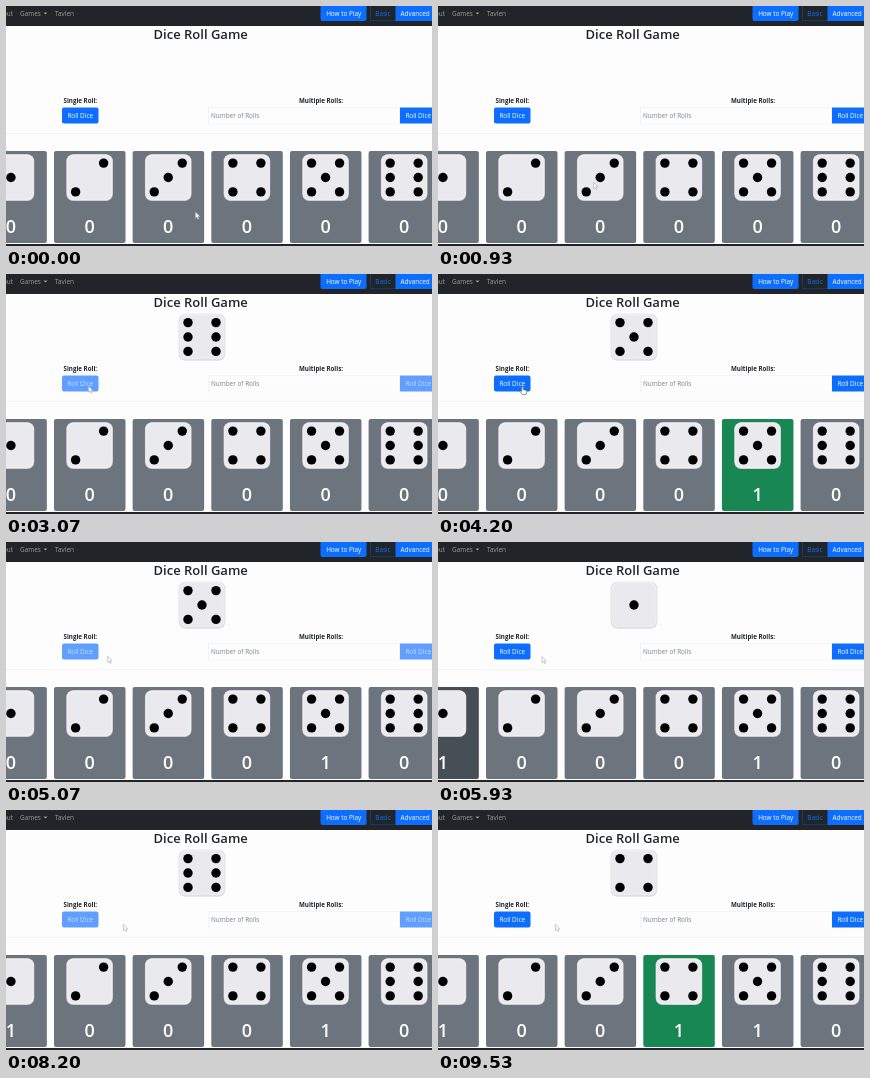
Recreate the animation shown at these times as an HTML page with a canvas. Size 426x240 px, loop 9590 ms.

```html
<!DOCTYPE html>
<html lang="en">
<head>
<meta charset="utf-8">
<title>Dice Roll Game</title>
<style>
  html, body { margin: 0; width: 100%; height: 100%; overflow: hidden; background: #fdfdfe; }
  canvas { display: block; width: 426px; height: 240px; }
</style>
</head>
<body>
<canvas id="stage"></canvas>
<script>
const LOOP = 9590, STEP = 100;
const BLUE = '#0d6efd', HOVER = '#0b5ed7', GREY = '#6c757d', GREEN = '#198754', DARK = '#212529';
const canvas = document.getElementById('stage');
const ctx = canvas.getContext('2d');
const scale = window.devicePixelRatio || 1;
canvas.width = 426 * scale;
canvas.height = 240 * scale;

// Each roll shows its faces one after another; the last one is the result.
const rolls = [
  { start: 2050, faces: '362415364261325' },
  { start: 4400, faces: '253641526345261' },
  { start: 7400, faces: '425316246153624' }
].map(r => ({ ...r, end: r.start + r.faces.length * STEP, result: +r.faces.at(-1) }));

// Pointer tip: time, x, y
const path = [[0, 189.5, 206], [500, 189.5, 206], [1650, 82.5, 112], [3300, 82.5, 112],
  [4000, 84.5, 112.5], [4600, 84.5, 112.5], [5200, 104, 114.5], [6200, 104, 114.5],
  [6850, 79, 109], [7550, 79, 109], [8050, 117.5, 114.5], [LOOP, 117.5, 114.5]];
const handTimes = [[1500, 2150], [3550, 4480], [6700, 7480]];
const hoverTimes = [[1500, 2050], [7200, 7400]];
const during = (t, spans) => spans.some(([a, b]) => t >= a && t < b);

function pointerAt(t) {
  const i = Math.max(1, path.findIndex(p => p[0] > t));
  const [t0, x0, y0] = path[i - 1], [t1, x1, y1] = path[i];
  const u = (t - t0) / (t1 - t0), e = u * u * (3 - 2 * u);
  return [x0 + (x1 - x0) * e, y0 + (y1 - y0) * e];
}

function box(x, y, w, h, r, fill) {
  ctx.beginPath();
  ctx.roundRect(x, y, w, h, r);
  ctx.fillStyle = fill;
  ctx.fill();
}

function outline(x, y, w, h, color) {
  ctx.strokeStyle = color;
  ctx.lineWidth = 0.5;
  ctx.strokeRect(x, y, w, h);
}

function text(str, x, y, size, color, weight = 400, align = 'center') {
  ctx.font = `${weight} ${size}px "Open Sans", "Noto Sans", sans-serif`;
  ctx.textAlign = align;
  ctx.fillStyle = color;
  ctx.fillText(str, x, y);
}

function die(face, cx, cy) {
  box(cx - 23.3, cy - 23.3, 46.6, 46.8, 7, '#cfcfd4');
  box(cx - 22.8, cy - 23, 45.6, 45.6, 6.5, '#efeff2');
  box(cx - 21.5, cy - 21.5, 43, 43, 6, '#e9e9ee');
  const spots = [];
  if (face % 2) spots.push([0, 0]);
  if (face > 1) spots.push([1, -1], [-1, 1]);
  if (face > 3) spots.push([-1, -1], [1, 1]);
  if (face === 6) spots.push([-1, 0], [1, 0]);
  ctx.fillStyle = '#000';
  for (const [x, y] of spots) {
    ctx.beginPath();
    ctx.arc(cx + x * 14, cy + y * 14.4, 4.7, 0, 7);
    ctx.fill();
  }
}

function navbar() {
  box(0, 0, 426, 20, 0, DARK);
  text('About', 7, 10, 6.4, '#9b9d9f', 400, 'right');
  text('Games', 14, 10, 6.4, '#9b9d9f', 400, 'left');
  ctx.fill(new Path2D('M37.5 6.5h4l-2 2z'));
  text('Tavlen', 49, 10, 6.4, '#9b9d9f', 400, 'left');
  box(314.5, -3, 46, 18, 2, BLUE);
  text('How to Play', 337.7, 10, 6.4, '#fff');
  outline(364.5, -3, 26, 17.7, '#0d4fb0');
  text('Basic', 377, 10, 6.4, BLUE);
  box(389.5, -3, 45, 18, 0, BLUE);
  text('Advanced', 394.5, 10, 6.4, '#fff', 400, 'left');
}

function rollButton(x, radius, color, disabled) {
  ctx.globalAlpha = disabled ? 0.65 : 1;
  box(x, 101.5, 36.5, 16, radius, color);
  text('Roll Dice', x + 18.2, 112, 6.4, '#fff');
  ctx.globalAlpha = 1;
}

function pointer(x, y, hand) {
  const shape = hand
    ? 'M-.8 .6Q0-.6 .8.6V3.2L3.6 3.8Q4.4 4 4.2 5L3.6 8H-.2L-2.6 4.8Q-2.4 3.6-.8 5Z'
    : 'M0 0V6.2L1.4 4.9 2.4 7.1 3.4 6.7 2.4 4.5H4.3Z';
  const p = new Path2D(shape);
  ctx.save();
  ctx.translate(x, y);
  ctx.fillStyle = '#fff';
  ctx.strokeStyle = hand ? '#555' : '#aaa';
  ctx.lineWidth = 0.6;
  ctx.fill(p);
  ctx.stroke(p);
  ctx.restore();
}

function cards(t, last) {
  for (let face = 1; face <= 6; face++) {
    const x = 48 + (face - 2) * 78.65, cx = x + 35.6;
    const hit = last && t >= last.end && last.result === face;
    const color = !hit ? GREY : t < last.end + 120 ? '#474f56' : GREEN;
    const count = rolls.filter(r => t >= r.end && r.result === face).length;
    box(x, 145, 71.5, 92, 2, color);
    die(face, cx, 171.5);
    text(count, cx, 227.3, 18, '#fff', 600);
  }
}

function draw(t) {
  const last = rolls.findLast(r => t >= r.start);
  const rolling = last && t < last.end;
  ctx.setTransform(scale, 0, 0, scale, 0, 0);
  box(0, 0, 426, 240, 0, '#fdfdfe');
  navbar();
  text('Dice Roll Game', 194.7, 33.2, 13, DARK, 600);
  if (last) {
    const step = Math.min(last.faces.length - 1, Math.floor((t - last.start) / STEP));
    die(+last.faces[step], 196, 63);
  }
  text('Single Roll:', 74.3, 96.7, 6.2, DARK, 700);
  text('Multiple Rolls:', 315, 96.7, 6.2, DARK, 700);
  rollButton(56, 2, during(t, hoverTimes) ? HOVER : BLUE, rolling);
  outline(202.5, 101.5, 191, 16.5, '#ececf0');
  rollButton(394, [0, 2, 2, 0], BLUE, rolling);
  text('Number of Rolls', 205, 112, 6.4, '#7b838a', 400, 'left');
  box(0, 127, 426, 0.5, 0, '#eeeef0');
  cards(t, last);
  box(0, 238, 426, 2, 0, DARK);
  pointer(...pointerAt(t), during(t, handTimes));
}

function tick() {
  draw(performance.now() % LOOP);
  requestAnimationFrame(tick);
}
tick();
</script>
</body>
</html>
```
